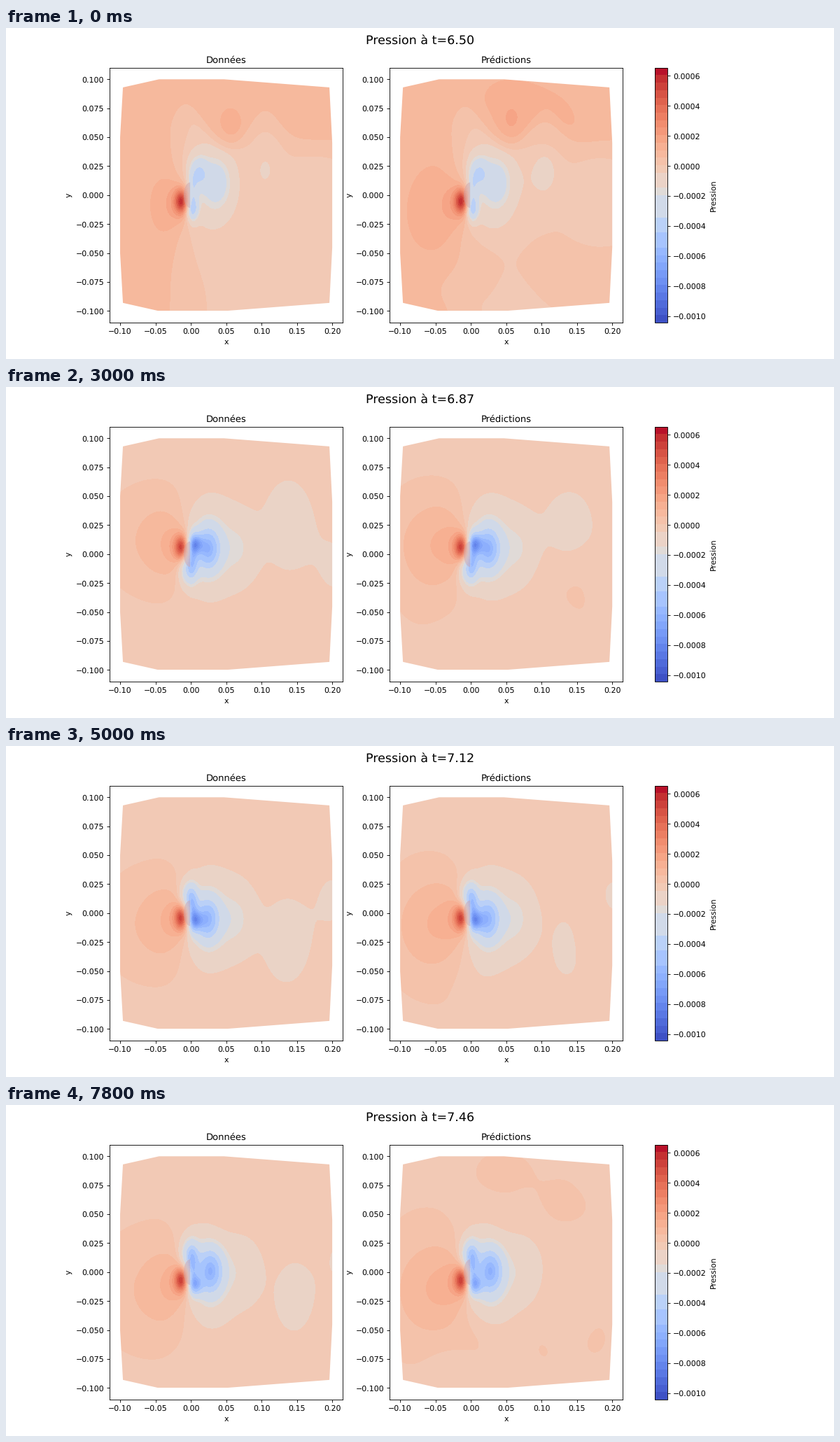
Recreate the animation shown at these times as a matplotlib script. Size 1183x473 px, loop 8 s.

```python
import numpy as np
import matplotlib.pyplot as plt
from matplotlib.animation import FuncAnimation
from matplotlib.cm import ScalarMappable
from matplotlib.colors import BoundaryNorm, ListedColormap
from matplotlib.patches import Polygon

W, H = 1183, 473
DPI = W / 15
FRAMES, INTERVAL = 40, 200
PERIOD = 6.75  # frames per shedding cycle

# Space is in thousandths, pressure in 1e-5.
X, Y = np.meshgrid(np.linspace(-100, 200, 304), np.linspace(-100, 100, 332))

# Life of one vortex shed from the lower edge; age counts shedding cycles.
AGE = [-0.68, -0.5, -0.26, 0, 0.24, 0.32, 0.5, 0.74, 1, 1.24, 1.32, 1.9]
PATH_X = [4, 2, -4, 11, 25, 30, 37, 72, 105, 140, 151, 225]
PATH_Y = [-13, -13, -13, -19, -3, 5, 11, 4, -21, -25, -19, -8]
SIZE = [6, 6, 9, 9, 13, 14, 15, 18, 10, 28, 17, 25]
DEPTH = [0, 28, 34, 26, 44, 44, 19, 9, 6, 7, 5, 3]


def bell(u, s):
    return np.exp(-0.5 * (u / s) ** 2)


def blob(x, y, sx, sy=None):
    return bell(X - x, sx) * bell(Y - y, sy or sx)


def step(u):
    return 0.5 * (1 + np.tanh(u))


def either(a, b):
    return 1 - (1 - a) * (1 - b)


def wave(phase, peak):
    return np.cos(2 * np.pi * (phase - peak))


def calm(phase):
    """1 when the wake is weak, 0 when a strong vortex is attached."""
    return 0.5 + 0.5 * wave(2 * phase, 0.96)


def vortices(phase):
    total = np.zeros_like(X)
    for side, start in ((1, -0.5), (-1, 0)):
        for age in phase + start + np.arange(-1, 3):
            if AGE[0] < age < AGE[-1]:
                x, y, s, d = (np.interp(age, AGE, key)
                              for key in (PATH_X, PATH_Y, SIZE, DEPTH))
                total -= d * blob(x, side * y, s, 1.1 * s)
    return total


def surroundings(phase):
    """Warm zones upstream and on the side facing the old vortex."""
    q = calm(phase)
    side = np.sign(wave(phase, 0))
    u = (phase - 0.25) % 0.5 + 0.25
    shift = 140 * (u - 0.5)
    limit = (44 + 25 * bell(X - 105 - shift, 20)
             + 32 * bell(X + 10, 24) - 6 * bell(X - 45 - shift, 15))
    zones = either(step((-22 - X) / 20), step((side * Y - limit) / 8))
    crest = blob(14 + 82 * u, side * (6 + 108 * u), 14, 12)
    base = -1.5 + 2 * q + 4 * bell(phase % 0.5 - 0.41, 0.04)
    return base + 7.5 * q * zones + 6 * np.sqrt(q) * crest


def pressure(phase):
    q = calm(phase)
    front = -7 * wave(phase, 0.87)
    field = surroundings(phase) + vortices(phase)
    for s, amp in ((6.5, 46), (12, 11), (23, 6)):
        field += amp * blob(-7 - s, front * (1 + s / 30), s, 1.1 * s)
    field += 7 * (1 - q) * blob(-60, 2.8 * front, 45, 32)
    field -= (11 + 6 * (1 - q)) * blob(23, 7 * wave(phase, 0.13), 28, 26)
    field -= 40 * (1 - q) * blob(6, 2 * front, 7, 6)
    field -= 23 * blob(2, 0.5, 5, 13)
    return field


rng = np.random.default_rng(4)
patches = [(blob(rng.uniform(-90, 190), rng.choice((-1, 1)) * rng.uniform(50, 95),
                 rng.uniform(15, 30), rng.uniform(10, 22)), rng.random())
           for _ in range(8)]


def error(n, phase):
    """Smooth mistakes of the prediction, slowly changing."""
    q = calm(phase)
    side = np.sign(wave(phase, 0))
    drift = sum(2.5 * wave(n / 20, start) * patch for patch, start in patches)
    warm = 3 * blob(-70, -15, 32, 40) + 4 * q * blob(85, 75 * side, 42, 18)
    wake = 3.5 * (1 - q) * blob(145, -20, 35, 25) - 4 * q * blob(97, 14 * side, 20, 16)
    return drift + warm + wake


edges = np.linspace(-104.2, 65.4, 35) * 1e-5
shades = plt.get_cmap("coolwarm")((np.arange(34) + 0.5) / 34)
for lo, hi in ((10, 12), (12, 14), (14, 17), (18, 20)):
    shades[lo:hi] = shades[lo:hi].mean(axis=0)
cmap = ListedColormap(shades)
norm = BoundaryNorm(edges, 34)

plt.rcParams["text.hinting"] = "none"
fig, axes = plt.subplots(1, 2, dpi=DPI, facecolor="white",
                         figsize=((W + 0.01) / DPI, (H + 0.01) / DPI))
heading = fig.suptitle("", fontsize=16)

corner = np.array([(-96, 93), (-45, 100), (47, 100), (196, 93), (200, 45)])
outline = np.vstack([corner, corner[::-1] * (1, -1), [(-100, -50), (-100, 50)]])
angle = np.radians(np.linspace(90, 270, 30))
body = np.column_stack([-1 + 9 * np.cos(angle), 11 * np.sin(angle)])


def panel(ax, title):
    image = ax.imshow(np.zeros_like(X), extent=(-0.1, 0.2, -0.1, 0.1),
                      origin="lower", aspect="auto", cmap=cmap, norm=norm,
                      interpolation="nearest")
    image.set_clip_path(Polygon(outline / 1000, transform=ax.transData))
    ax.add_patch(Polygon(body / 1000, color=(0.80, 0.63, 0.66), alpha=0.45, lw=0))
    ax.set(xlim=(-0.115, 0.215), ylim=(-0.11, 0.11), xlabel="x", ylabel="y",
           title=title, xticks=np.arange(-2, 5) * 0.05,
           yticks=np.arange(-4, 5) * 0.025)
    return image


data = panel(axes[0], "Données")
guess = panel(axes[1], "Prédictions")
bar = fig.colorbar(ScalarMappable(norm, cmap), ax=axes, label="Pression",
                   spacing="proportional", ticks=np.arange(-5, 4) * 2e-4)
bar.minorticks_off()


def update(n):
    phase = n / PERIOD % 1
    field = pressure(phase)
    data.set_data(field * 1e-5)
    guess.set_data((field + error(n, phase)) * 1e-5)
    heading.set_text(f"Pression à t={6.504 + 0.0246 * n:.2f}")
    return data, guess, heading


anim = FuncAnimation(fig, update, frames=FRAMES, interval=INTERVAL,
                     repeat=True, repeat_delay=0)
plt.show()
```
